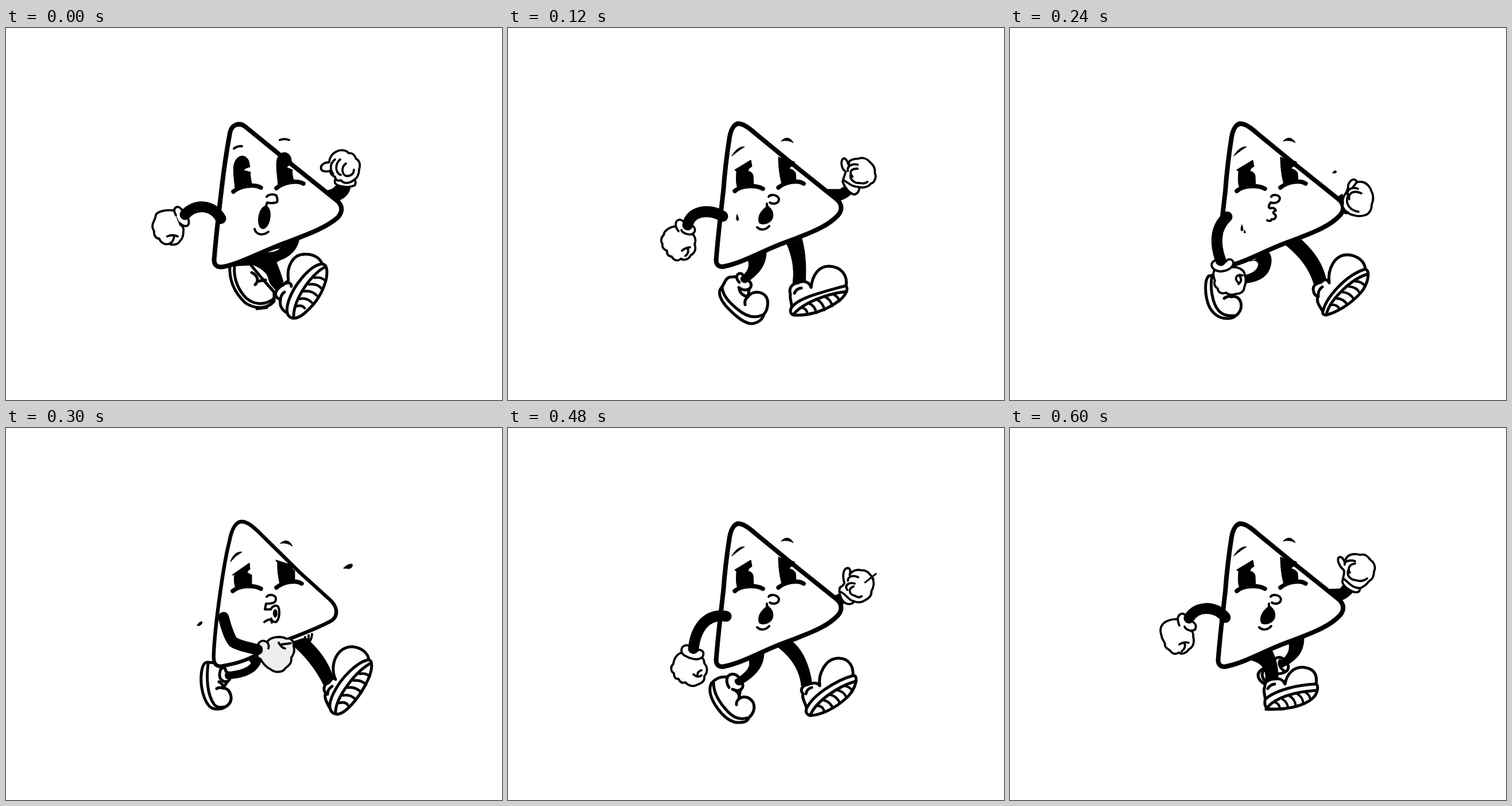
Write an HTML page that moves like this. It is 864 px wide and 648 px high and loops after 0.66 s.

```html
<!DOCTYPE html>
<html lang="en">
<head>
<meta charset="utf-8">
<title>Walking triangle</title>
<style>
html, body { margin: 0; width: 100%; height: 100%; overflow: hidden; background: #fff; }
svg { display: block; width: 100vw; height: 100vh; }
path, ellipse { stroke: #000; stroke-linecap: round; stroke-linejoin: round; fill: none; }
.w { fill: #fff; }
.g { fill: #eee; }
.k { fill: #000; stroke-width: 1; }
.body { fill: #fff; stroke-width: 8; }
.arm { stroke-width: 19; }
.hand { stroke-width: 3.8; }
.shoe { stroke-width: 5; }
.line { stroke-width: 4; }
.cheek { stroke-width: 7.5; }

/* eleven 60 ms slots: the walk goes forward, rests, then runs back */
.pose { opacity: 0; animation: 660ms step-end infinite; }
#p0 { animation-name: a0; }
#p1 { animation-name: a1; }
#p2 { animation-name: a2; }
#p3 { animation-name: a3; }
#p4 { animation-name: a4; }
#p5 { animation-name: a5; }
@keyframes a0 { 0% { opacity: 1 } 9.09% { opacity: 0 } }
@keyframes a1 { 0%, 18.18% { opacity: 0 } 9.09%, 90.9% { opacity: 1 } }
@keyframes a2 { 0%, 27.27%, 90.9% { opacity: 0 } 18.18%, 81.81% { opacity: 1 } }
@keyframes a3 { 0%, 36.36%, 81.81% { opacity: 0 } 27.27%, 72.72% { opacity: 1 } }
@keyframes a4 { 0%, 45.45%, 72.72% { opacity: 0 } 36.36%, 63.63% { opacity: 1 } }
@keyframes a5 { 0%, 63.63% { opacity: 0 } 45.45% { opacity: 1 } }
</style>
</head>
<body>
<svg viewBox="0 0 864 648">
<defs>
  <path id="tread" stroke-width="4.4" d="M18,-6 q8,7 5,14 M32,-8 q9,9 6,21 M47,-9 q9,10 6,23 M62,-8 q9,10 6,21 M77,-6 q7,7 6,16"/>
  <path id="body" class="body" d="M386,190 C389,172 397,165 404,167 C412,168 420,174 430,183 L497,238 L572,298 C583,307 582,318 575,326 C555,348 520,359 490,371 C450,384 415,407 378,415 C366,418 361,411 363,399 C366,360 371,320 375,285 C378,245 382,215 386,190Z"/>
  <path id="cheeks" class="cheek" d="M395,284 C407,274 432,273 444,280 M471,278 C483,268 505,264 515,271"/>
  <g id="face">
    <path class="k" d="M395,247 L423,230 L425,241 Q419,244 418,249 Q426,251 427,257 L428,275 L400,279 C396,268 398,258 398,250Z"/>
    <path class="k" d="M471,225 L499,233 L500,240 Q492,240 490,245 Q499,247 501,253 L502,268 L477,272C473,258 471,240 471,225Z"/>
    <path class="k" d="M390,223 C396,212 404,206 412,207 Q402,213 390,223Z M476,197 C483,189 492,190 497,200 Q488,194 476,197Z"/>
    <use href="#cheeks"/>
  </g>
  <g id="mouth">
    <path class="line" d="M454,294 C457,289 470,290 472,298 C472,306 462,308 456,304 M434,347 C440,353 449,352 455,345 M451,306 V313"/>
    <path class="k" d="M451,308 C458,314 464,320 461,331 C458,340 445,344 438,340 C434,332 438,320 449,312Z"/>
  </g>
</defs>

<g id="p0" class="pose">
  <path class="k" d="M545,276 L552,283 C562,284 570,281 574,275 L600,275 C600,287 590,298 577,301Z"/>
  <g class="hand">
    <path class="w" d="M570,219 C580,210 592,212 597,218 C605,217 608,223 610,228 C618,232 617,242 615,247 C615,256 611,262 607,264 C611,270 608,275 605,275 C595,279 577,276 573,270 C571,265 576,264 573,259 C568,257 566,255 564,249 C560,250 552,251 549,246 C547,240 553,234 563,234 C563,230 565,223 570,219Z"/>
    <path d="M573,229 C564,236 564,248 570,254 M582,229 C572,238 574,252 583,256 M592,236 C583,243 585,257 594,258 Q606,257 606,247 M573,261 Q577,268 583,265 C590,273 600,270 607,264"/>
  </g>
  <g class="shoe">
    <path class="w" d="M390,413 C388,440 399,462 417,479 C434,490 455,490 467,476 L467,460 L445,435 L425,411Z"/>
    <path d="M398,416 C396,438 406,458 418,470 C431,482 450,484 466,472 M428,426 C437,430 442,440 434,447 M440,441 L452,439 M437,489 L454,487"/>
  </g>
  <path class="k" d="M410,409 L511,366 C508,386 495,398 478,404 L471,408 C476,420 480,432 483,442 L472,458 C465,452 459,446 457,436 C455,425 440,415 425,411Z"/>
  <path d="M453,391 C462,387 470,385 477,384 C472,389 462,391 453,391Z" style="fill:#fff;stroke:none"/>
  <g class="shoe">
    <path class="w" d="M551,412 C548,402 538,394 522,394 C500,393 488,415 492,440 C484,446 479,449 472,456 C467,465 470,470 478,473 C476,485 482,492 489,496Z"/>
    <path d="M482,448 C490,441 498,444 497,450 M478,473 Q479,464 485,460"/>
    <path class="w" d="M550,411 C557,411 559,418 559,424 C560,440 549,466 535,482 C522,496 510,508 498,505 C488,502 488,490 492,476 C501,448 530,413 550,411Z"/>
    <path d="M557,416 C536,424 501,470 501,503"/>
    <use href="#tread" transform="translate(501,503) rotate(-57)"/>
  </g>
  <path class="body" d="M390,183 C393,167 407,164 417,172 L498,238 L578,302 C588,312 585,322 578,330 C555,350 520,361 490,373 C450,387 410,410 378,416 C366,418 361,411 363,399 C366,360 371,320 375,285 C379,250 384,215 390,183Z"/>
  <path class="k" d="M399,280 C398,265 394,245 398,235 C403,220 418,219 423,232 L425,242 Q416,244 414,248 L426,251 C425,258 427,266 429,275Z"/>
  <path class="k" d="M474,275 C473,255 468,235 474,224 C481,212 496,216 497,230 L498,237 Q490,240 489,243 L499,247 C498,255 500,262 502,268Z"/>
  <path class="cheek" d="M396,285 C408,275 432,271 444,278 M471,279 C483,269 506,264 518,271"/>
  <path class="line" d="M397,210 Q404,205 411,206 M477,195 Q485,192 493,195 M454,294 C458,289 468,289 471,292 Q475,303 470,304 Q463,306 455,304 L453,310 M433,350 C436,361 448,362 457,355"/>
  <ellipse class="k" cx="450" cy="330" rx="10" ry="20" transform="rotate(9 450 330)"/>
  <g class="hand">
    <path class="w" d="M294,318 C280,316 263,319 261,326 C260,333 258,335 256,340 C254,348 256,350 258,354 C257,362 262,367 267,367 C270,375 278,378 284,376 C292,379 300,377 303,371 C308,367 309,360 309,354 C310,348 308,345 304,343Z"/>
    <path class="w" d="M296,326 C288,312 300,308 305,315 L314,326 C320,334 320,344 314,345 Q308,345 303,340"/>
    <path d="M281,363 Q290,359 299,363 M293,362 Q292,372 286,375"/>
  </g>
  <path class="arm" d="M374,332 C360,306 328,306 312,325"/>
</g>

<g id="p1" class="pose">
  <path class="k" d="M553,281 L575,280 L583,270 L598,285 C588,297 578,301 568,302Z"/>
  <g class="hand">
    <path class="w" d="M586,226 C592,218 604,219 610,221 C620,218 625,226 628,230 C636,235 637,245 634,250 C634,259 630,265 625,267 C620,275 612,278 610,279 C609,285 607,287 600,286 C590,283 580,275 579,268 C580,258 585,250 580,246 C573,240 570,230 572,226 C577,222 581,228 583,234Z"/>
    <path d="M583,238 C582,232 592,229 601,232 M601,236 C590,238 588,245 592,252 M590,246 C585,256 592,264 602,265 C610,268 617,266 622,262 M580,262 C590,268 595,279 610,279"/>
  </g>
  <g class="shoe">
    <path class="w" d="M462,402 C472,394 485,408 485,416 C485,425 475,428 466,428 L448,448 C432,441 426,428 440,420Z"/>
    <path d="M443,420 Q434,432 447,443 M470,405 Q466,414 478,424"/>
  </g>
  <path class="k" d="M486,376 L512,366 C512,390 500,405 474,417 L468,408 C482,398 488,390 486,376Z"/>
  <path class="k" d="M418,404 L456,387 C464,402 468,420 467,440 L445,440 C447,420 438,408 418,404Z"/>
  <g class="shoe">
    <path class="w" d="M533,447 C536,430 530,419 512,417 C495,415 482,428 479,446 C475,438 470,436 463,437 C452,437 443,442 444,450 C440,458 445,466 445,478Z"/>
    <path d="M449,454 Q453,447 461,446"/>
    <path class="w" d="M445,472 C465,455 505,447 533,446 C538,448 536,462 529,469 C512,486 475,492 448,489 C443,484 443,476 445,472Z"/>
    <path d="M448,487 C462,470 495,459 535,457 M446,490 H460"/>
    <use href="#tread" transform="translate(447,488) rotate(-19) scale(.93)"/>
  </g>
  <use href="#body"/><use href="#face"/><use href="#mouth"/>
  <g class="hand">
    <path class="w" d="M293,333 C283,332 268,336 264,345 C260,352 263,358 264,362 C264,367 268,370 270,376 C269,383 275,384 280,389 C284,395 291,394 294,391 C300,396 308,391 312,385 C321,381 321,370 319,363 C320,357 318,355 315,353Z"/>
    <path class="w" d="M295,344 C287,326 300,318 306,327 L319,338 C327,344 325,354 314,353 Q306,351 304,346"/>
    <path d="M295,377 Q303,372 311,374 M304,375 Q307,383 299,389"/>
  </g>
  <path class="arm" d="M375,330 C358,309 325,309 312,331"/>
</g>

<g id="p2" class="pose">
  <path class="k" d="M553,281 L578,281 L592,272 L599,288 C590,298 575,302 568,303Z"/>
  <g class="hand">
    <path class="w" d="M594,233 C600,226 608,229 612,227 C620,225 627,229 631,234 C638,240 640,246 639,252 C643,262 637,270 632,271 C628,277 618,279 612,277 C612,285 608,290 602,290 C594,287 587,278 583,268 C584,260 588,255 588,250 C580,245 578,228 586,227 C591,229 592,236 594,240Z"/>
    <path d="M592,249 C590,240 600,236 609,238 M609,245 C596,245 594,252 600,259 M597,254 C594,264 604,271 613,270 Q621,272 626,268 M584,265 C592,268 597,277 612,277"/>
  </g>
  <g class="shoe">
    <path class="w" d="M372,452 C378,445 378,436 386,434 L399,433 L420,455 L418,468 C425,458 440,458 448,466 C456,475 452,492 446,498 C444,508 435,514 425,515 C412,515 398,503 385,490 C370,475 364,460 372,452Z"/>
    <path d="M373,452 C374,465 386,479 400,490 C414,502 428,507 443,500 M418,468 Q411,474 413,482 M403,456 Q406,466 418,468"/>
    <path class="w" d="M403,443 C394,434 400,425 407,428 L422,443 C428,452 416,462 402,452"/>
  </g>
  <path class="k" d="M418,404 L450,389 C450,410 440,428 414,444 Q405,444 405,435 C418,425 422,415 418,404Z"/>
  <path class="k" d="M486,377 L512,367 C518,390 520,415 518,444 L496,444 C500,420 494,395 486,377Z"/>
  <g class="shoe">
    <path class="w" d="M589,450 C592,430 580,416 560,415 C542,414 530,430 528,452 C525,442 515,439 505,444 C493,446 489,454 492,464 C490,472 495,478 494,488Z"/>
    <path d="M499,462 Q502,454 511,453"/>
    <path class="w" d="M494,487 C505,470 548,460 588,449 C594,453 589,465 578,474 C555,492 525,502 497,500 C491,498 491,491 494,487Z"/>
    <path d="M497,499 C515,478 555,463 590,459"/>
    <use href="#tread" transform="translate(497,499) rotate(-23)"/>
  </g>
  <use href="#body"/><use href="#face"/><use href="#mouth"/>
  <path class="k" d="M399,325 Q404,334 400,336 Q396,334 399,325Z"/>
  <g class="hand">
    <path class="w" d="M296,346 C285,344 272,352 271,361 C266,365 266,372 269,376 C268,382 272,386 277,388 C276,394 280,398 285,398 C289,405 296,407 301,402 C308,406 316,402 318,396 C326,392 328,384 325,377 C328,370 326,362 320,358Z"/>
    <path class="w" d="M297,354 C288,343 293,333 300,334 C306,335 308,340 310,343 L322,345 C330,352 324,362 312,359 Q304,357 302,352"/>
    <path d="M303,388 Q308,383 317,382 M313,384 Q316,392 309,397"/>
  </g>
  <path class="arm" d="M374,328 C350,314 318,318 313,343"/>
</g>

<g id="p3" class="pose">
  <path class="k" d="M564,294 L580,288 L585,306 L574,312Z"/>
  <g class="hand">
    <path class="w" d="M595,256 C600,247 610,246 616,248 C625,247 632,255 635,262 C639,270 636,280 633,284 C634,292 628,297 622,300 C615,305 608,304 603,302 C600,308 590,308 585,303 C578,296 576,285 578,278 C580,276 584,276 586,270 C582,258 584,245 591,244 C597,244 597,250 595,256Z"/>
    <path d="M592,266 C592,258 602,256 610,260 M604,271 C592,268 586,275 591,282 M602,276 C591,280 595,291 604,292 Q611,297 616,293 M580,286 C588,288 592,300 603,302"/>
    <path stroke-width="3" d="M622,269 L641,254 M631,256 L637,263"/>
  </g>
  <g class="shoe">
    <path class="w" d="M354,445 C362,436 370,432 382,434 L405,455 L402,472 C410,466 421,468 427,478 C432,490 425,500 420,504 C418,510 412,513 404,513 C393,514 382,508 372,497 C357,480 347,460 354,445Z"/>
    <path d="M358,444 C358,460 368,478 382,493 C392,504 404,509 416,505 M402,472 Q397,477 398,482 M397,458 Q405,464 402,472"/>
    <path class="w" d="M385,452 C376,437 384,427 394,429 Q402,431 405,440 C415,450 405,463 391,455"/>
  </g>
  <path class="k" d="M420,405 L446,390 C446,412 436,430 404,448 Q395,448 395,439 C412,428 424,418 420,405Z"/>
  <path class="k" d="M468,380 L494,371 C512,385 524,410 529,442 L511,449 C508,420 492,398 468,380Z"/>
  <g class="shoe">
    <path class="w" d="M601,432 C602,415 594,401 576,401 C552,401 540,430 543,449 C538,442 530,444 522,447 C510,449 509,458 514,463 C511,470 518,478 520,488Z"/>
    <path d="M519,463 Q520,455 529,452"/>
    <path class="w" d="M520,489 C530,466 570,440 602,431 C611,432 606,453 592,468 C570,489 545,500 526,501 C520,499 518,494 520,489Z"/>
    <path d="M527,499 C538,475 575,450 606,441"/>
    <use href="#tread" transform="translate(527,499) rotate(-36)"/>
  </g>
  <use href="#body"/><use href="#face"/><use href="#mouth"/>
  <g class="hand">
    <path class="w" d="M304,391 C294,393 289,402 288,411 C282,416 284,425 289,427 C289,434 292,438 297,437 C300,444 305,445 309,443 C315,450 324,451 330,447 C340,444 343,438 342,432 C349,425 347,415 342,410 C342,402 338,400 335,398Z"/>
    <path class="w" d="M309,397 C300,393 300,382 308,379 C314,377 318,380 317,387 L330,387 C337,385 342,390 340,396 C338,402 330,404 322,402 C316,401 312,399 309,397Z"/>
    <path d="M323,429 Q330,436 337,431 M337,422 Q329,424 330,433"/>
  </g>
  <path class="arm" d="M380,328 C345,322 327,350 323,384"/>
</g>

<g id="p4" class="pose">
  <path class="k" d="M568,296 L579,289 L582,306 L575,310Z"/>
  <g class="shoe">
    <path class="w" d="M346,432 L357,430 L386,468 C394,466 400,471 402,478 C405,490 398,498 392,502 C388,506 382,506 378,506 C362,506 350,495 345,480 C340,465 338,440 346,432Z"/>
    <path d="M352,432 C348,450 352,480 364,493 Q374,503 390,501 M373,471 Q379,466 386,468"/>
  </g>
  <path class="k" d="M426,404 L446,386 C458,395 456,410 452,420 C445,438 425,443 406,445 L408,431 C422,428 432,422 433,411 Q430,402 418,406Z"/>
  <path class="k" d="M480,378 L508,369 C530,390 545,410 551,440 L530,448 C522,420 505,398 480,378Z"/>
  <g class="shoe">
    <path class="w" d="M619,420 C618,408 607,396 588,395 C565,395 553,420 556,444 C552,436 546,438 542,443 C532,445 526,450 529,459 C529,465 534,466 536,468 C533,478 540,485 545,494Z"/>
    <path d="M537,468 Q536,456 544,451"/>
    <path class="w" d="M545,494 C550,470 585,430 619,420 C628,423 624,445 612,460 C595,480 570,495 551,500 C546,500 544,498 545,494Z"/>
    <path d="M551,499 C557,473 595,437 622,429"/>
    <use href="#tread" transform="translate(551,499) rotate(-44)"/>
  </g>
  <use href="#body"/><use href="#face"/>
  <path class="line" d="M455,294 C458,289 468,290 470,296 C470,304 461,306 454,304 C450,309 450,313 453,314 Q461,312 463,318 Q455,321 462,325 C465,331 460,334 456,333 Q454,338 448,335"/>
  <path class="k" d="M404,343 Q408,352 404,354 Q400,352 404,343Z M408,352 L411,356 L408,357Z M562,252 Q566,246 569,250 Q567,255 562,252Z"/>
  <g class="hand">
    <path class="w" d="M589,278 C588,270 596,261 602,265 Q605,267 603,270 C605,267 608,268 612,268 C622,269 628,278 630,285 C635,295 632,303 630,308 C630,318 624,325 618,326 C608,330 595,326 588,322 C580,325 578,312 580,305 C578,298 582,292 586,286Z"/>
    <path d="M603,270 L597,278 M606,280 C594,276 587,282 588,290 M612,288 C598,281 588,289 591,298 M588,294 C584,306 592,318 607,320 M580,312 Q584,320 590,322"/>
    <path class="w" d="M357,420 C352,428 355,435 357,440 C354,446 358,452 362,454 C362,461 370,464 376,461 C382,466 390,465 394,463 C403,463 408,458 408,452 C411,445 411,436 409,430 C408,420 395,415 386,417Z"/>
    <path class="w" d="M365,424 C352,422 347,412 355,406 C360,402 365,406 366,409 L376,407 C380,400 390,403 389,410 C388,418 378,424 365,424Z"/>
    <path d="M405,431 C395,428 390,436 397,443 M400,432 Q406,440 398,446"/>
  </g>
  <path class="arm" d="M378,329 C355,350 358,380 367,405"/>
</g>

<g id="p5" class="pose">
  <path class="hand w" d="M533,359 C533,370 525,378 518,381 M527,361 Q529,371 519,375 M521,364 Q522,369 517,371"/>
  <g class="shoe">
    <path class="w" d="M351,408 C342,408 339,425 340,445 C342,465 350,487 362,489 C370,490 376,490 380,487 C390,482 393,475 392,468 C391,460 386,453 378,453 L387,440 L374,410Z"/>
    <path d="M352,411 C349,435 350,465 363,482 Q368,488 380,486 M367,454 Q371,451 378,453 M371,442 Q379,446 378,453"/>
    <path class="w" d="M374,420 Q382,414 383,424 C394,429 392,441 383,442 C374,441 369,434 374,420Z"/>
  </g>
  <path class="k" d="M424,405 L446,395 C446,420 425,436 384,437 Q379,431 384,425 C405,424 422,418 427,410Z"/>
  <path class="k" d="M494,374 L522,365 C545,385 562,408 570,435 L554,449 C540,420 520,395 494,374Z"/>
  <g class="shoe">
    <path class="w" d="M632,405 C632,395 622,383 604,381 C575,380 563,415 574,438 C569,433 567,438 562,444 C553,447 552,456 557,462 C553,470 560,480 564,488Z"/>
    <path d="M560,464 Q560,455 568,450"/>
    <path class="w" d="M630,404 C636,403 637,409 637,414 C637,432 620,462 602,482 C590,495 578,503 569,496 C561,489 563,477 571,461 C585,433 612,408 630,404Z"/>
    <path d="M635,410 C610,423 573,470 574,497"/>
    <use href="#tread" transform="translate(575,498) rotate(-55) scale(1.05)"/>
  </g>
  <path class="body" style="stroke-width:6.4" d="M389,198 C393,176 400,163 411,163 C422,164 430,172 440,181 L510,250 L563,298 C578,311 579,326 568,335 C545,348 520,357 497,366 L440,393 C415,408 390,412 375,415 C362,416 361,405 362,390 C364,350 371,300 377,260 C381,235 384,217 389,198Z"/>
  <path class="k" d="M394,256 L424,235 L425,246 Q421,248 420,252 L428,256 V275 L400,279 Q396,268 398,256Z"/>
  <path class="k" d="M470,230 L502,240 L503,245 L497,243 L503,249 V268 L477,272 Q472,250 473,235Z"/>
  <use href="#cheeks"/>
  <path class="k" d="M391,233 C395,221 402,215 411,216 Q400,222 391,233Z M478,201 C485,194 494,195 499,206 Q490,199 478,201Z"/>
  <path class="line" d="M454,294 C458,289 468,290 470,296 C471,304 466,306 453,306 L451,316 H461 C464,310 470,308 474,311 C478,320 476,334 470,338 Q463,338 462,332 M450,338 Q462,329 463,339"/>
  <ellipse class="k" cx="469" cy="323" rx="3.5" ry="7"/>
  <path class="k" d="M588,244 Q596,236 603,237 Q605,243 598,245Z M333,344 Q337,336 342,338 Q340,346 333,344Z"/>
  <g class="hand">
    <path class="g" d="M439,384 C437,374 445,367 455,373 C460,363 480,362 488,367 C497,365 502,372 501,380 C504,390 500,395 497,400 C498,412 490,415 487,418 C482,427 468,426 462,421 C452,417 447,408 443,402 C436,400 437,394 441,390Z"/>
    <path d="M455,373 Q459,379 457,384 M475,374 Q480,383 486,384 M480,377 L496,375"/>
  </g>
  <path class="arm" d="M379,330 C384,350 391,368 396,373 C405,379 425,383 438,386"/>
</g>
</svg>
</body>
</html>
```
